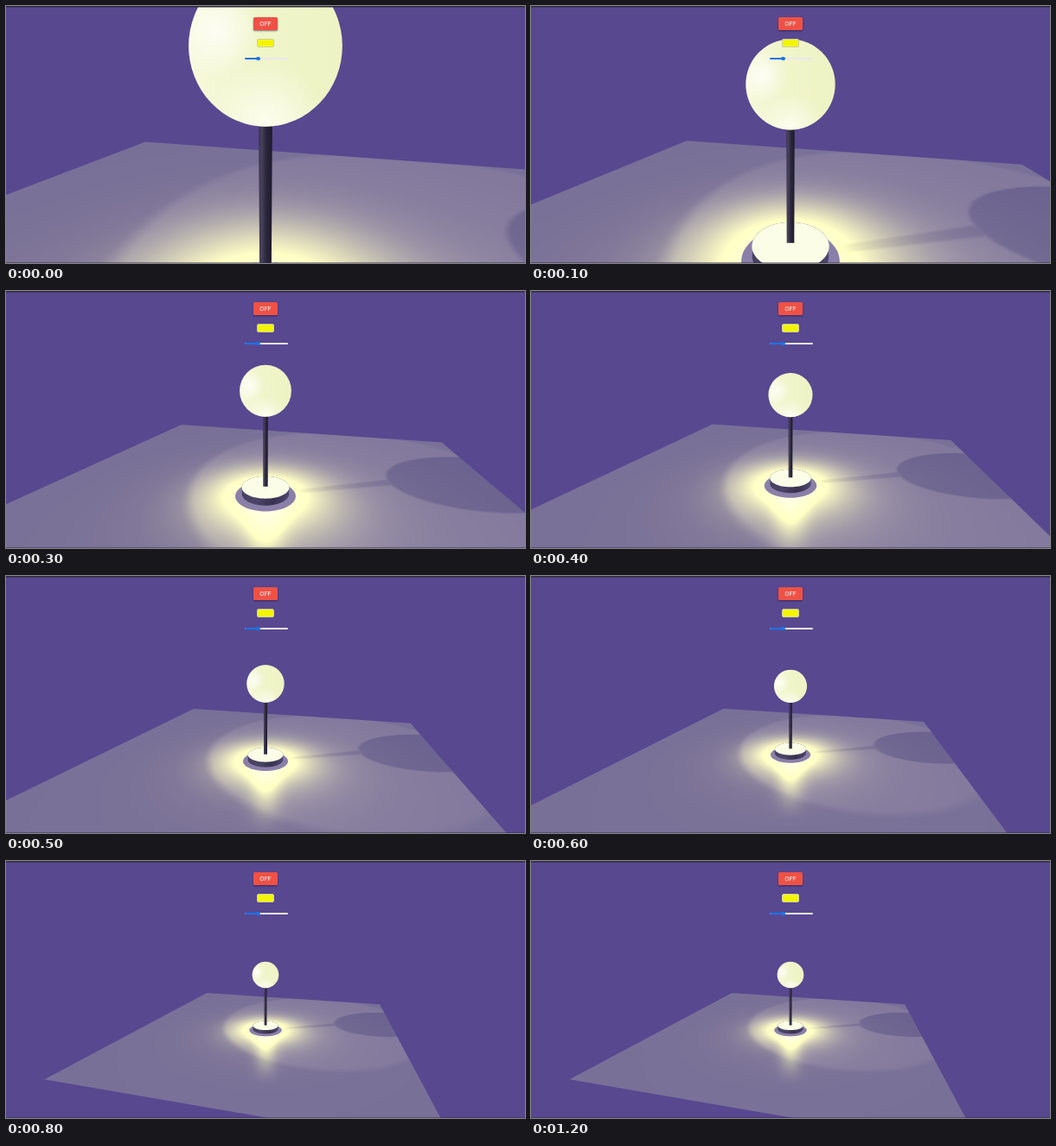
Write an HTML page with a canvas that moves like this. It is 600 px wide and 298 px high and loops after 1.3 s.

```html
<!DOCTYPE html>
<html lang="en">
<head>
<meta charset="utf-8">
<title>Lamp</title>
<style>
  html, body { margin: 0; width: 100%; height: 100%; overflow: hidden; background: #584890; }
  canvas { position: absolute; left: 0; top: 0; }
  .ui { position: absolute; box-sizing: border-box; }
  #off {
    left: 286px; top: 13px; width: 28px; height: 15px; border-radius: 1.5px;
    background: #ef5145; color: #fff; box-shadow: 0 1px 2px rgba(20, 10, 50, .55);
    font: 7.5px/15px Roboto, Arial, sans-serif; text-align: center;
  }
  #color {
    left: 290px; top: 37.5px; width: 20px; height: 10.5px; border-radius: 2px;
    background: #f3f500; border: 1px solid #cfcfa8;
  }
  #track { left: 275.5px; top: 59.7px; width: 50px; height: 2.6px; border-radius: 2px; background: #e9e8ef; }
  #fill { left: 275.5px; top: 59.7px; width: 16px; height: 2.6px; border-radius: 2px; background: #1a73e8; }
  #thumb { left: 289.3px; top: 58.6px; width: 4.8px; height: 4.8px; border-radius: 50%; background: #1a73e8; }
</style>
</head>
<body>
<canvas id="stage" width="600" height="298"></canvas>
<div class="ui" id="off">OFF</div>
<div class="ui" id="color"></div>
<div class="ui" id="track"></div>
<div class="ui" id="fill"></div>
<div class="ui" id="thumb"></div>
<script>
const W = 600, H = 298, CX = 300, CY = 149;
const FOCAL = 318, PITCH = 0.2346, YAW = 0.247;
const S = Math.sin(PITCH), C = Math.cos(PITCH);
const STEP = 100, LOOP = 1300;

// Camera distance at each step, in globe radii
const ZOOM = [3.97, 6.5, 9.15, 10.95, 12.77, 14.95, 16.95, 19, 21.04];

const GLOBE_Y = 1.14, FLOOR_Y = -3.3, FLOOR_HALF = 9.84;
const BASE_TOP = -2.92, BASE_BOTTOM = -3.22, POLE_R = 0.097;

const ctx = document.getElementById('stage').getContext('2d');
const layer = document.createElement('canvas');
layer.width = W;
layer.height = H;
const lctx = layer.getContext('2d');
let dist = ZOOM[0];

const smooth = (a, b, x) => {
  const t = Math.min(1, Math.max(0, (x - a) / (b - a)));
  return t * t * (3 - 2 * t);
};
const depthOf = (v, w) => dist + w * C - v * S;

function project(u, v, w) {
  const k = FOCAL / depthOf(v, w);
  return [CX + u * k, CY - (v * C + w * S) * k, k];
}

function trace(points) {
  ctx.beginPath();
  points.forEach(p => ctx.lineTo(p[0], p[1]));
  ctx.closePath();
}

// Floor outline, cut in front of the camera
function floorOutline() {
  const near = 0.4, cs = Math.cos(YAW), sn = Math.sin(YAW);
  const corners = [[-1, 1], [1, 1], [1, -1], [-1, -1]].map(([a, b]) =>
    [(a * cs + b * sn) * FLOOR_HALF, (b * cs - a * sn) * FLOOR_HALF]);
  const out = [];
  corners.forEach((p, i) => {
    const q = corners[(i + 1) % 4];
    const dp = depthOf(FLOOR_Y, p[1]), dq = depthOf(FLOOR_Y, q[1]);
    if (dp > near) out.push(project(p[0], FLOOR_Y, p[1]));
    if ((dp > near) !== (dq > near)) {
      const t = (near - dp) / (dq - dp);
      out.push(project(p[0] + (q[0] - p[0]) * t, FLOOR_Y, p[1] + (q[1] - p[1]) * t));
    }
  });
  return out;
}

function shadeFloor() {
  const img = lctx.createImageData(W, H), px = img.data;
  const drop = -FLOOR_Y * C, far = depthOf(FLOOR_Y, 0);
  const baseY = project(0, FLOOR_Y, 0)[1];
  const mirrorY = project(0, 2 * FLOOR_Y - GLOBE_Y, 0)[1];
  const streakW = 0.85 * FOCAL / far;

  for (let y = 148; y < H; y++) {
    const slope = (CY - y - 0.5) / FOCAL;
    const w = (slope * far + drop) / (S - slope * C);
    const unit = (far + w * C) / FOCAL;
    const along = (y - baseY) / (mirrorY - baseY);
    const fade = smooth(-0.1, 0.2, along) * (1 - smooth(0.2, 1.15, along));

    for (let x = 0; x < W; x++) {
      const sx = x + 0.5 - CX, u = sx * unit;

      // Pool of the side light, with the shadows of globe and pole in it
      const pool = 1 - smooth(7.5, 8.2, Math.hypot(u - 4.4, w - 1.6));
      const gu = u - 10, gw = w - 1.5;
      const globe = Math.hypot((gu * 0.983 + gw * 0.186) / 4.3, (gw * 0.983 - gu * 0.186) / 2.85);
      const off = Math.abs(w - u * 0.2) / (0.12 + Math.max(0, u) * 0.025);
      const pole = u > 0.8 && u < 6.2 ? 1 - smooth(0.6, 1.5, off) : 0;
      const shade = Math.max(1 - smooth(0.96, 1.03, globe), pole * 0.75);

      // Warm light around the foot and its reflection towards the viewer
      const d2 = u * u + w * w;
      const glow = Math.exp(-d2 / 7.5) * (0.72 + 0.28 * pool);
      const wide = Math.exp(-d2 / 40);
      const streak = fade * Math.exp(-((sx / streakW) ** 2));
      const lit = pool * (8 + 12 * wide) - shade * 22;

      const i = (y * W + x) * 4;
      px[i] = 121 + lit + wide * 8 + glow * 165 + streak * 85;
      px[i + 1] = 112 + lit + wide * 8 + glow * 176 + streak * 92;
      px[i + 2] = 152 + lit * 0.6 + glow * 52 + streak * 24;
      px[i + 3] = 255;
    }
  }
  lctx.putImageData(img, 0, 0);
}

function ring(v, r) {
  const pts = [];
  for (let i = 0; i < 64; i++) {
    const a = i / 32 * Math.PI;
    pts.push(project(r * Math.cos(a), v, r * Math.sin(a)));
  }
  return pts;
}

function gradient(x0, x1, stops) {
  const g = ctx.createLinearGradient(x0, 0, x1, 0);
  stops.forEach(([t, c]) => g.addColorStop(t, c));
  return g;
}

function drawBase() {
  if (depthOf(FLOOR_Y, -1.3) < 0.4) return;
  trace(ring(FLOOR_Y, 1.28));
  ctx.fillStyle = '#8a7fa8';
  ctx.fill();

  const low = ring(BASE_BOTTOM, 1), top = ring(BASE_TOP, 1);
  const r = project(0, BASE_TOP, 0)[2];
  ctx.fillStyle = gradient(CX - r, CX + r,
    [[0, '#45405f'], [0.3, '#4b4568'], [0.65, '#38324f'], [1, '#4d4670']]);
  // Right end, front of the lower rim, left end, back of the upper rim
  trace([...low.slice(32), low[0], ...top.slice(0, 33)]);
  ctx.fill();
  trace(top);
  ctx.fillStyle = '#fbfde6';
  ctx.fill();
}

function drawPole() {
  const a = project(0, 0.3, 0), b = project(0, BASE_TOP, 0);
  const ra = POLE_R * a[2], rb = POLE_R * b[2];
  trace([[CX - ra, a[1]], [CX + ra, a[1]], [CX + rb, b[1]], [CX - rb, b[1]]]);
  ctx.fillStyle = gradient(CX - ra, CX + ra,
    [[0, '#37324a'], [0.2, '#48435b'], [0.55, '#2b263b'], [1, '#1f1b2c']]);
  ctx.fill();
}

function radial(x, y, r, color, strength) {
  const g = ctx.createRadialGradient(x, y, 0, x, y, r);
  g.addColorStop(0, `rgba(${color},${strength})`);
  g.addColorStop(0.45, `rgba(${color},${strength * 0.55})`);
  g.addColorStop(1, `rgba(${color},0)`);
  ctx.fillStyle = g;
  ctx.fill();
}

function drawGlobe() {
  const z = depthOf(GLOBE_Y, 0), y = GLOBE_Y * C;
  const mid = Math.atan2(y, z), half = Math.asin(1 / Math.hypot(y, z));
  const top = CY - FOCAL * Math.tan(mid + half);
  const bottom = CY - FOCAL * Math.tan(mid - half);
  ctx.save();
  ctx.translate(CX, (top + bottom) / 2);
  ctx.scale(FOCAL * Math.tan(half) / Math.cos(mid), (bottom - top) / 2);
  ctx.beginPath();
  ctx.arc(0, 0, 1, 0, Math.PI * 2);
  ctx.fillStyle = gradient(-1, 1, [[0, '#f7f9dc'], [0.4, '#f1f5cb'], [1, '#eef3c4']]);
  ctx.fill();
  radial(-0.64, -0.2, 0.6, '255,255,250', 0.85);
  radial(0, 0.95, 0.75, '255,255,245', 0.85);
  ctx.restore();
}

function draw(step) {
  dist = ZOOM[Math.min(step, ZOOM.length - 1)];
  ctx.fillStyle = '#584890';
  ctx.fillRect(0, 0, W, H);

  shadeFloor();
  ctx.save();
  trace(floorOutline());
  ctx.clip();
  ctx.drawImage(layer, 0, 0);
  ctx.restore();

  drawBase();
  drawPole();
  drawGlobe();

  ctx.fillStyle = '#302b3c';
  ctx.fillRect(0, 0, W, 1.5);
  ctx.fillStyle = 'rgba(45,38,75,.45)';
  ctx.fillRect(0, H - 1, W, 1);
}

let shown = 0;
const start = performance.now();
draw(0);

function tick() {
  const step = Math.floor((performance.now() - start) % LOOP / STEP);
  if (step !== shown) draw(shown = step);
  requestAnimationFrame(tick);
}
requestAnimationFrame(tick);
</script>
</body>
</html>
```
